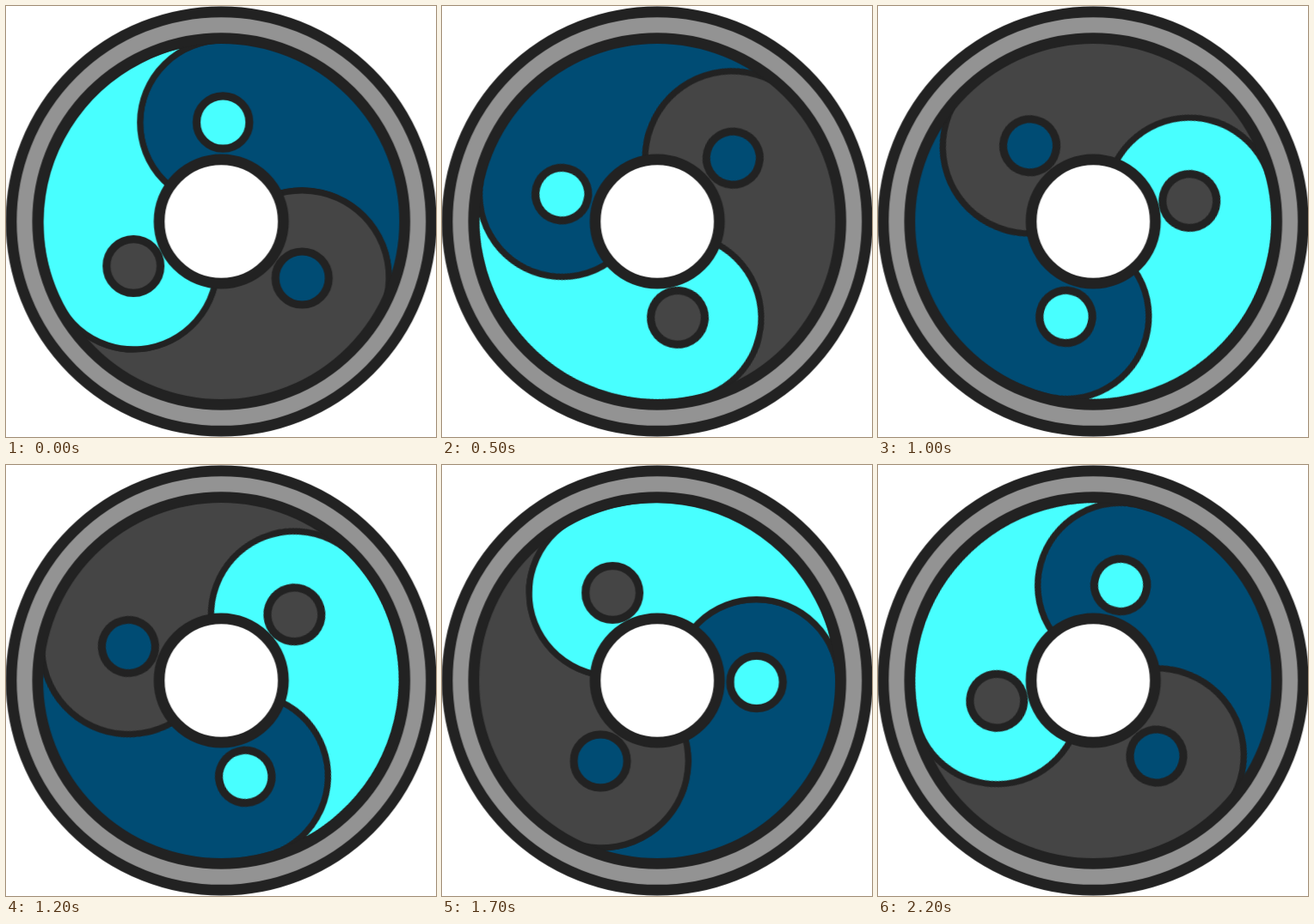
An HTML page without scripts for the animation above (2300 ms loop, 500 px wide and 502 px high).

```html
<!DOCTYPE html>
<html lang="en">
<head>
<meta charset="utf-8">
<title>Spinning triskele</title>
<style>
  html, body { margin: 0; width: 100%; height: 100%; overflow: hidden; background: #fff; }
  svg { display: block; width: 500px; height: 502px; }

  .wheel {
    stroke: #222;
    stroke-width: 7.2;
    stroke-linejoin: round;
    transform-origin: 0 0;
    animation: spin 2.3s infinite;
  }
  .wheel circle { stroke-width: 9.2; }
  .navy { fill: #004c74; }
  .cyan { fill: #48ffff; }
  .coal { fill: #454545; }

  /* 15 degrees per tick, with one double tick at 700 ms */
  @keyframes spin {
    0% { transform: rotate(0deg); animation-timing-function: steps(7, end); }
    30.4347% { transform: rotate(-105deg); animation-timing-function: step-start; }
    30.4348% { transform: rotate(-120deg); animation-timing-function: steps(16, end); }
    100% { transform: rotate(-360deg); }
  }
</style>
</head>
<body>
<svg viewBox="0 0 500 502">
  <g transform="translate(250.3 250.9)">
    <!-- Undersized head radii scale up to exact half circles -->
    <g class="wheel">
      <path class="navy" d="M.8-19A90 90 0 0 1 2.4-211A213 213 0 0 1 177.1 122.1A90 90 0 0 0 10.9 7.5Z"/>
      <path class="coal" d="M10.9 7.5A90 90 0 0 1 177.1 122.1A213 213 0 0 1 -188.4 96A90 90 0 0 0 -15.6 8Z"/>
      <path class="cyan" d="M-15.6 8A90 90 0 0 1 -188.4 96A213 213 0 0 1 2.4-211A90 90 0 0 0 .8-19Z"/>
      <circle class="cyan" cx="2" cy="-115.5" r="30.7"/>
      <circle class="navy" cx="94" cy="66" r="31"/>
      <circle class="coal" cx="-102" cy="52" r="31.4"/>
    </g>
    <g fill="none" stroke="#222" stroke-width="12.7">
      <circle r="229" stroke="#939393" stroke-width="22"/>
      <circle r="213.4"/>
      <circle r="244.2"/>
      <circle r="72.2" fill="#fff"/>
    </g>
  </g>
</svg>
</body>
</html>
```
